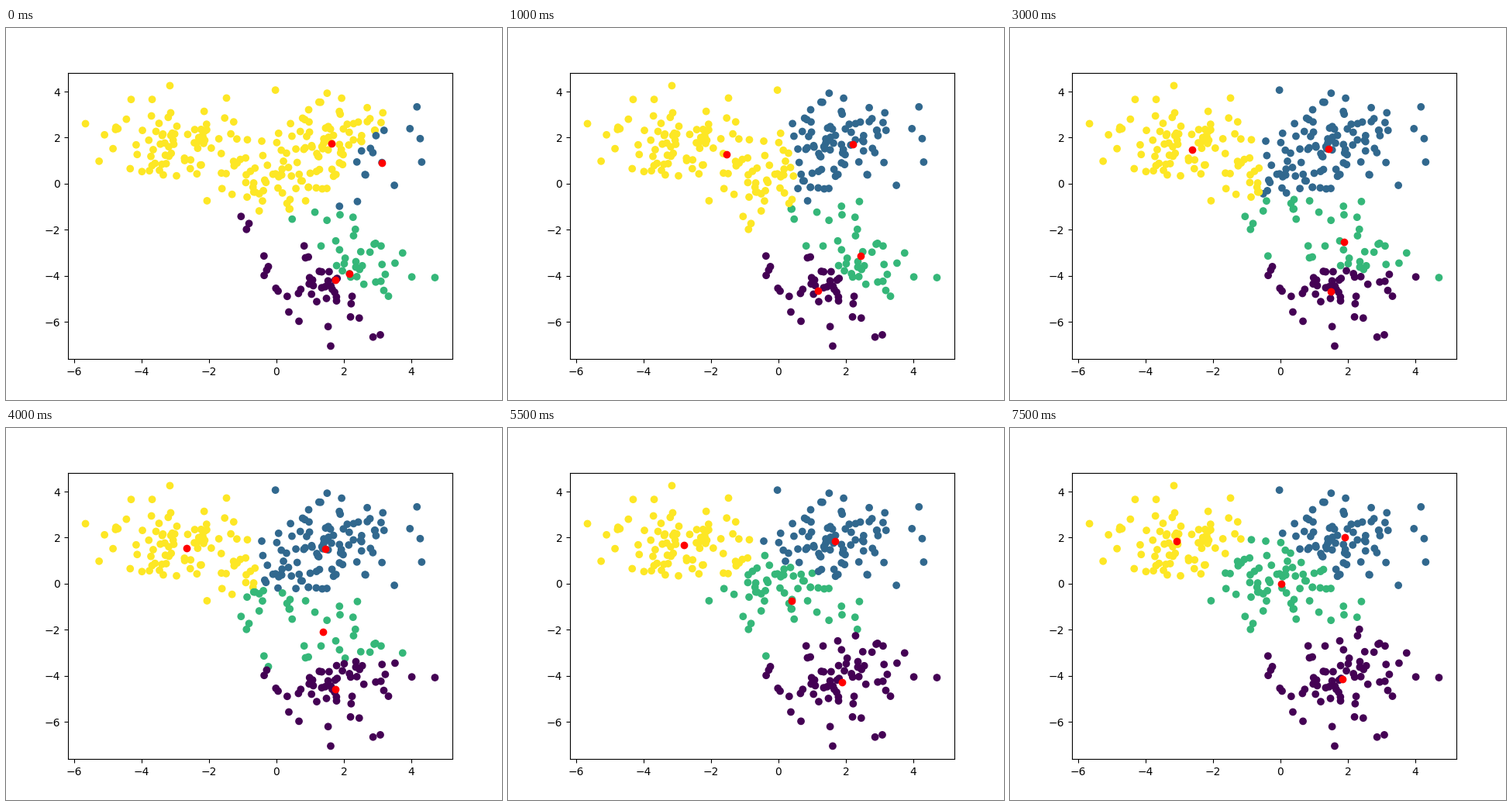
These frames come from a looping animation (640x480 px, 8000 ms). A matplotlib script:

```python
import numpy as np
import matplotlib.pyplot as plt
from matplotlib.animation import FuncAnimation

STEPS = 16
BLOB_CENTERS = [(0, 0), (2, 2), (-3, 2), (2, -4)]
SEED_POINTS = [(1.75, -4.18), (3.13, 0.91), (2.17, -3.92), (1.64, 1.73)]


def make_points(per_blob=75):
    rng = np.random.RandomState(0)
    points = np.vstack([rng.normal(c, 1, (per_blob, 2)) for c in BLOB_CENTERS])
    order = np.arange(len(points))
    rng.shuffle(order)
    return points[order]


def distances(points, centers):
    return np.linalg.norm(points[:, None] - centers[None], axis=2)


def run_kmeans(points, centers, steps):
    """Return (labels, centers) for each Lloyd iteration."""
    history = []
    for _ in range(steps):
        labels = distances(points, centers).argmin(axis=1)
        history.append((labels, centers))
        centers = np.array([points[labels == k].mean(axis=0)
                            for k in range(len(centers))])
    return history


points = make_points()
# Start from the data points closest to the chosen seeds.
start = points[distances(points, np.array(SEED_POINTS)).argmin(axis=0)]
history = run_kmeans(points, start, STEPS)

fig, ax = plt.subplots(figsize=(6.4, 4.8), dpi=100)
labels, centers = history[0]
dots = ax.scatter(*points.T, c=labels, cmap="viridis", vmin=0, vmax=3)
means = ax.scatter(*centers.T, c="r")


def update(step):
    labels, centers = history[step]
    dots.set_array(labels)
    means.set_offsets(centers)
    return dots, means


anim = FuncAnimation(fig, update, frames=STEPS, interval=500,
                     repeat=True, repeat_delay=0)
plt.show()
```
